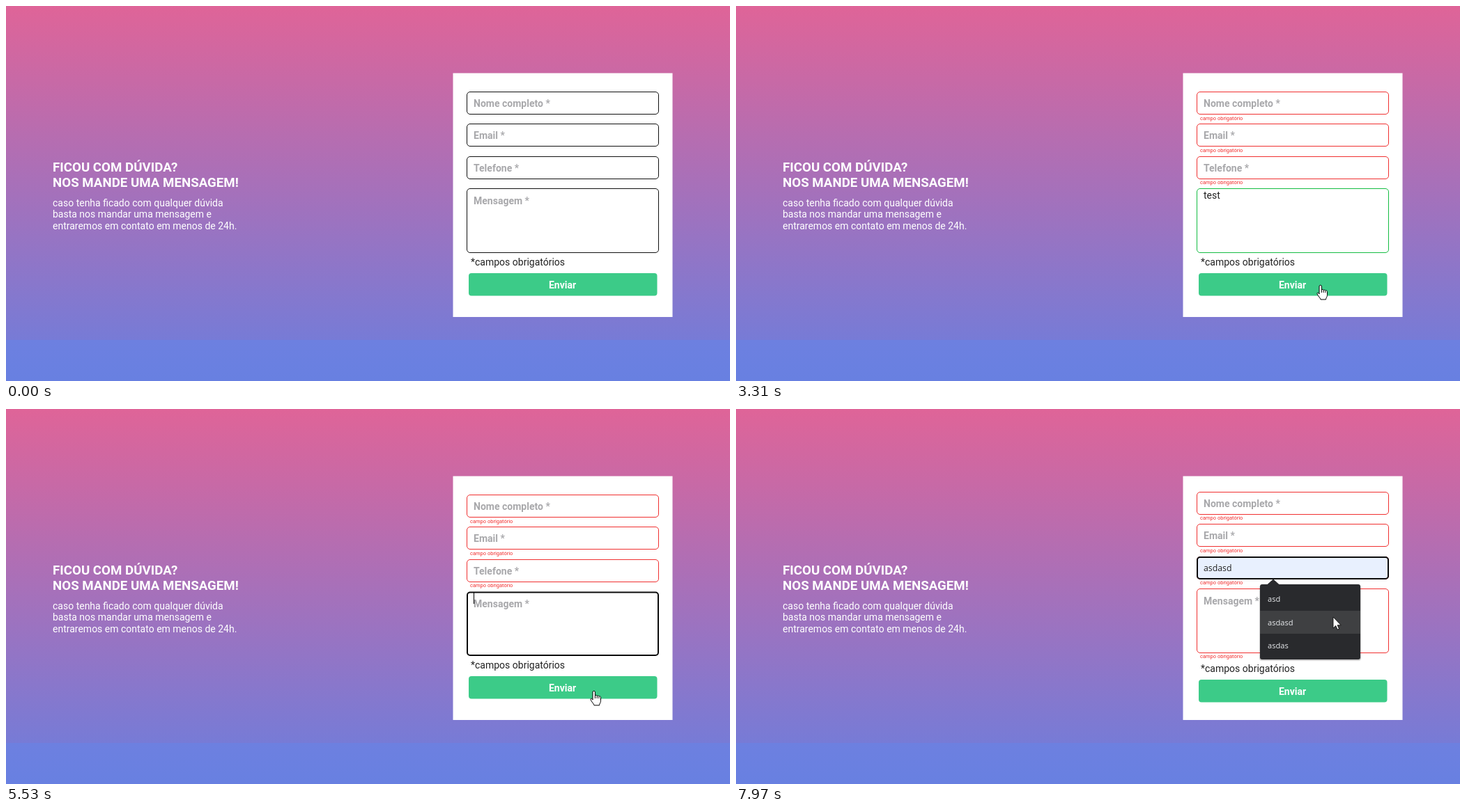
An HTML page for the animation above (8 s loop, 1039 by 539 pixels).

```html
<!DOCTYPE html>
<html lang="pt">
<head>
<meta charset="utf-8">
<title>Formulário de contato</title>
<style>
  html, body { margin: 0; width: 100%; height: 100%; overflow: hidden; }
  body { background: linear-gradient(#df6498, #777bd6 89%, #6d80e0 89%, #6880e1); }
  svg { display: block; width: 1039px; height: 539px; }
  text { font: 14px Roboto, sans-serif; fill: #222; white-space: pre; }
  .title text { font-size: 18.72px; font-weight: 700; fill: #fff; }
  .lead text { fill: #fff; }
  .hint { font-weight: 700; fill: #a8a8ab; }
  .error { font-size: 7.5px; fill: #f22c2c; }
  .send { font-weight: 700; fill: #fff; text-anchor: middle; }
  .system { font: 12.3px "Open Sans", "Noto Sans", sans-serif; }
  .menu text { font: 11.1px "Open Sans", "Noto Sans", sans-serif; fill: #e8eaed; }
  .box { fill: none; stroke: #111; }
  .focus { fill: none; stroke: #0c0c0c; stroke-width: 2; }
  .bad { stroke: #f03030; }
  .good { stroke: #14bd42; }
  .off { display: none; }
  .selected { fill: #fff; }
  .pointer path { stroke: #000; stroke-linejoin: round; }
</style>
</head>
<body>
<svg viewBox="0 0 1039 539">
  <g class="title">
    <text x="67" y="238">FICOU COM DÚVIDA?</text>
    <text x="67" y="260">NOS MANDE UMA MENSAGEM!</text>
  </g>
  <g class="lead">
    <text x="67" y="287.5">caso tenha ficado com qualquer dúvida</text>
    <text x="67" y="304">basta nos mandar uma mensagem e</text>
    <text x="67" y="321">entraremos em contato em menos de 24h.</text>
  </g>

  <rect x="641.5" y="96.5" width="315" height="350.5" fill="#fff"/>

  <g id="boxes">
    <rect class="box required" x="661.5" y="123.5" width="275" height="32" rx="4.5"/>
    <rect class="box required" x="661.5" y="169.5" width="275" height="32" rx="4.5"/>
    <rect class="box required" x="661.5" y="216.5" width="275" height="32" rx="4.5"/>
    <rect class="box" id="messageBox" x="661.5" y="262.5" width="275" height="92" rx="4.5"/>
    <rect class="focus" id="messageFocus" x="662" y="263.5" width="274" height="90.5" rx="4"/>
    <rect class="focus" id="phoneFocus" x="662" y="217" width="274" height="31" rx="4"/>
  </g>

  <g id="labels">
    <text class="hint" x="671" y="145">Nome completo *</text>
    <text class="hint" x="671" y="191">Email *</text>
    <text class="hint" id="phoneHint" x="671" y="237.5">Telefone *</text>
    <text class="hint" id="messageHint" x="671" y="285">Mensagem *</text>
    <text class="system" id="phoneText" x="671" y="237.5">asdasd</text>
    <g id="errors">
      <text class="error" x="666" y="163.5">campo obrigatório</text>
      <text class="error" x="666" y="210">campo obrigatório</text>
      <text class="error" x="666" y="256">campo obrigatório</text>
    </g>
    <text class="error" id="messageError" x="666" y="362.5">campo obrigatório</text>
  </g>

  <rect id="selection" x="671" y="264" height="16" fill="#0078d7"/>
  <text id="messageText" x="671" y="276.5"></text>

  <g id="footer">
    <text x="667" y="373">*campos obrigatórios</text>
    <rect x="664" y="384" width="270.5" height="32.5" rx="4" fill="#3ccb88"/>
    <text class="send" x="798.5" y="405.5">Enviar</text>
  </g>

  <g class="menu" id="menu">
    <rect x="751" y="253" width="146" height="109" rx="4" fill="#000" opacity=".18"/>
    <path d="M761.5 253l9.5-8.5 9.5 8.5z" fill="#292a2d"/>
    <rect x="752" y="252" width="144" height="108" rx="3" fill="#292a2d"/>
    <rect id="menuHover" x="752" y="290" width="144" height="33" fill="#3f4042"/>
    <text x="763" y="277">asd</text>
    <text x="763" y="310.5">asdasd</text>
    <text x="763" y="344">asdas</text>
  </g>

  <circle id="click" r="11" fill="#faf000" fill-opacity=".52"/>
  <rect id="caret" width="1" height="16" fill="#000"/>
  <g class="pointer" id="pointer">
    <path id="arrow" fill="#fff" stroke-width=".8"
      d="M0 0v16l3.7-3.5 2.5 5.6 2.3-1-2.4-5.4h5z"/>
    <path id="beam" fill="none"
      d="M-3.5-7.5h2.5q1 0 1 1v13q0 1-1 1h-2.5M3.5-7.5h-2.5q-1 0-1 1M3.5 7.5h-2.5q-1 0-1-1"/>
    <path id="hand" fill="#fff"
      d="M-2 13V2a1.7 1.7 0 0 1 3.4 0v5a1.6 1.6 0 0 1 2.8.6 1.6 1.6 0 0 1 2.7.8 1.5 1.5 0 0 1 2.6 1v5c0 3-2 4-2 6.5h-7.5c0-2-4.5-5.5-5-8.5-.2-1.5 1.8-2 3 .6zM1.4 7v4M4.2 8v3M6.9 9v2"/>
  </g>
</svg>
<script>
  const LOOP = 8000, STEP = 70;
  const $ = id => document.getElementById(id);
  const show = (id, on) => $(id).classList.toggle('off', !on);
  const shift = (id, x, y) => $(id).setAttribute('transform', `translate(${x} ${y})`);
  const within = (t, ...spans) => spans.some(([a, b]) => t >= a && t < b);

  // Each move: start time, number of steps, bend point, end point.
  const home = [890, 450];
  const moves = [
    [130, 12, [862, 335], [825, 308]],
    [970, 1, [822, 316], [820, 323]],
    [1970, 7, [846, 437], [841, 404]],
    [3310, 11, [800, 340], [722, 317]],
    [4280, 4, [670, 312], [618, 300]],
    [4560, 4, [660, 350], [735, 386]],
    [5040, 8, [795, 402], [844, 405]],
    [5660, 2, [844, 407], [843, 409]],
    [6190, 2, [852, 409], [859, 408]],
    [6720, 12, [806, 320], [842, 230]],
    [7690, 5, [846, 270], [857, 299]]
  ];
  const keys = [1370, 1440, 1640, 1710];
  const cleared = 5040;

  function pointerAt(t) {
    let from = home;
    for (const [start, steps, bend, to] of moves) {
      if (t < start) break;
      const k = Math.min(steps, Math.floor((t - start) / STEP) + 1) / steps;
      const u = k * k * (3 - 2 * k), v = 1 - u;
      const here = from.map((a, i) => v * v * a + 2 * u * v * bend[i] + u * u * to[i]);
      if (k < 1) return here;
      from = to;
    }
    return from;
  }

  function pointerKind(x, y, up, down, dragging, menuOpen) {
    if (dragging) return 'beam';
    if (menuOpen && y > 250) return 'arrow';
    if (x < 661 || x > 937) return 'arrow';
    if (x > 664 && x < 935 && y >= 384 + down && y <= 416 + down) return 'hand';
    const fields = [[123, 156], [169, 202], [216, 249], [262, 355]];
    return fields.some(([a, b]) => y >= a + up && y <= b + up) ? 'beam' : 'arrow';
  }

  function render(t) {
    const checked = t >= 2850, rechecked = t >= 5930;
    const up = rechecked ? -4 : 0, down = rechecked ? 5 : 0;
    const menuOpen = t >= 7690;
    const messageFocus = within(t, [970, 2780], [4070, 5860]);
    const phoneFocus = t >= 7560;
    const [x, y] = pointerAt(t);
    const preview = menuOpen && y >= 290;

    shift('boxes', 0, up);
    shift('labels', 0, rechecked ? -4.5 : 0);
    shift('footer', 0, down);
    document.querySelectorAll('.required').forEach(el => el.classList.toggle('bad', checked));
    const box = $('messageBox').classList;
    box.toggle('good', checked && !rechecked);
    box.toggle('bad', rechecked);
    show('messageBox', !messageFocus);
    show('messageFocus', messageFocus);
    show('phoneFocus', phoneFocus);
    $('phoneFocus').style.fill = preview ? '#e8f0fe' : 'none';
    show('errors', checked);
    show('messageError', rechecked);

    const typed = t < cleared ? keys.filter(k => t >= k).length : 0;
    const text = $('messageText');
    text.textContent = 'test'.slice(0, typed);
    const width = typed ? text.getComputedTextLength() : 0;
    const selected = within(t, [4350, cleared]);
    text.classList.toggle('selected', selected);
    show('selection', selected);
    $('selection').setAttribute('width', width);
    show('messageHint', !typed);
    show('phoneHint', !preview);
    show('phoneText', preview);

    show('caret', within(t, [970, 2240], [4070, 4350], [cleared, 5600]) || phoneFocus && !preview);
    shift('caret', Math.round(671 + width - .3), phoneFocus ? 220 : 264);

    show('menu', menuOpen);
    show('menuHover', preview);

    show('click', within(t, [970, 1110], [2780, 2850], [4070, 4560], [5860, 5930], [7560, 7640]));
    shift('click', x - 1.5, y - .5);

    show('pointer', t >= 130);
    const kind = pointerKind(x, y, up, down, within(t, [4070, 4560]), menuOpen);
    for (const id of ['arrow', 'beam', 'hand']) show(id, id === kind);
    const half = kind === 'beam' ? .5 : 0;
    shift('pointer', Math.round(x) + half, Math.round(y));
  }

  const begin = performance.now();
  function tick() {
    render((performance.now() - begin) % LOOP);
    requestAnimationFrame(tick);
  }
  tick();
</script>
</body>
</html>
```
